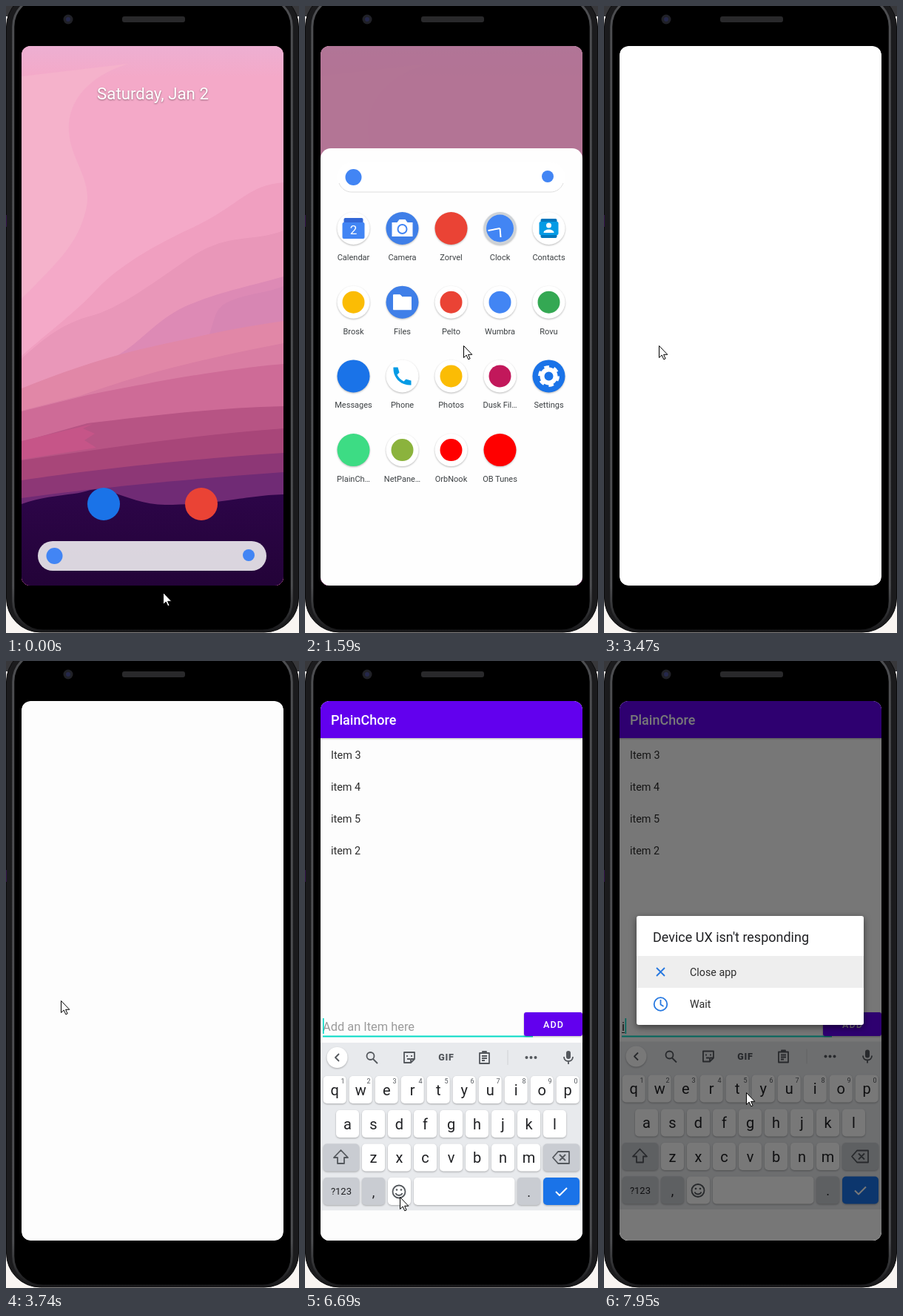
These frames come from a looping animation (396 px wide and 846 px high, 8000 ms). An HTML page:

```html
<!DOCTYPE html>
<html lang="en">
<head>
<meta charset="utf-8">
<title>Phone demo</title>
<style>
  html, body { margin: 0; width: 100%; height: 100%; overflow: hidden; background: #f9f5f2; }
  svg { display: block; width: 396px; height: 846px; font-family: Roboto, sans-serif; }
  .mid { text-anchor: middle; }
  .line { fill: none; stroke: #54585d; stroke-width: 1.8; stroke-linejoin: round; }
  .lift { filter: drop-shadow(0 1px 1px rgba(0, 0, 0, .28)); }
</style>
</head>
<body>
<svg id="stage" viewBox="0 0 396 846"></svg>
<script>
const LOOP = 8000;
const BLUE = '#1a73e8', PURPLE = '#6200ee', TEAL = '#03dac5';

const rect = (x, y, w, h, fill, r = 0, extra = '') =>
  `<rect x="${x}" y="${y}" width="${w}" height="${h}" rx="${r}" fill="${fill}" ${extra}/>`;
const circle = (x, y, r, fill, extra = '') =>
  `<circle cx="${x}" cy="${y}" r="${r}" fill="${fill}" ${extra}/>`;
const path = (d, fill, extra = '') => `<path d="${d}" fill="${fill}" ${extra}/>`;
const line = (d, extra = '') => `<path class="line" d="${d}" ${extra}/>`;
const text = (x, y, size, fill, value, extra = '') =>
  `<text x="${x}" y="${y}" font-size="${size}" fill="${fill}" ${extra}>${value}</text>`;
const group = (id, body, extra = '') => `<g id="${id}" ${extra}>${body}</g>`;
const MID = 'class="mid"', LIFT = 'class="lift"';

function phone() {
  return rect(0, 0, 396, 14, '#38383b') +
    rect(.5, -18, 395, 863, '#1b1b1d', 46, 'stroke="#0b0b0c"') +
    rect(9.75, -12, 376.5, 855, '#000', 40, 'stroke="url(#rim)" stroke-width="3"') +
    rect(0, 282, 1, 16, '#35134a') +
    circle(84, 18, 6.5, '#202127') + circle(84, 18, 3, '#25284b') +
    rect(157, 14, 85, 8, '#29292b', 3);
}

function wallpaper() {
  const layers = [
    ['#f09fc0', 'M21 472C60 438 95 412 120 385S185 330 250 300 325 242 375 238'],
    ['#e997b9', 'M21 476C55 445 78 428 115 418S190 380 245 342 330 320 375 303'],
    ['#dd8ab5', 'M150 472C185 452 205 420 250 402S330 378 375 365'],
    ['#d786b3', 'M274 445C284 420 280 406 308 396S350 388 375 378'],
    ['#e187a7', 'M21 516C80 492 140 472 200 459S310 434 375 425'],
    ['#d97da3', 'M21 546L100 526C160 505 230 483 375 455'],
    ['#ce6b97', 'M21 547L110 525C190 509 290 490 375 483'],
    ['#b75484', 'M21 588L110 563C190 554 280 542 375 540'],
    ['#c65588', 'M21 587L117 564 104 570 120 577 106 586 122 596 21 612'],
    ['#a84679', 'M21 613C130 598 240 580 375 570'],
    ['#8d3776', 'M21 640C120 625 250 611 375 603'],
    ['#702b75', 'M21 664C120 650 250 638 375 629'],
    ['url(#night)', 'M21 672C45 663 70 661 92 658S118 648 140 655 188 673 215 673 270 671 300 667 345 660 375 659']
  ];
  return rect(21, 54, 354, 728, '#f4a9c8') +
    rect(21, 54, 354, 42, 'url(#sky)') +
    path('M21 95L165 78C110 95 82 130 85 170S118 235 108 275 82 335 21 395Z', '#f5b2cb') +
    layers.map(([fill, d]) =>
      path(d + (fill === '#c65588' ? 'Z' : 'V782H' + d.match(/\d+/)[0] + 'Z'), fill)).join('');
}

const disc = (fill, art = '') => circle(0, 0, 22, fill, LIFT) + art;
const badge = fill => disc('#fff', circle(0, 0, 15, fill));
const gear = `${circle(0, 0, 9, 'none', 'stroke="#fff" stroke-width="6"')}
  ${circle(0, 0, 12.5, 'none', 'stroke="#fff" stroke-width="4" stroke-dasharray="6.5 6.6"')}`;

const apps = [
  ['Calendar', disc('#fff', rect(-13, -14, 26, 8, '#3367d6', 2) + rect(-15, -8, 30, 22, '#4285f4', 2) +
    text(0, 8, 17, '#fff', '2', MID))],
  ['Camera', disc('#3f7fe8', path('M-14 -8H-7L-4 -12H4L7 -8H14V11H-14Z', '#fff') +
    circle(0, 1, 7, '#4285f4') + circle(0, 1, 5, '#fff'))],
  ['Zorvel', disc('#ea4335')],
  ['Clock', disc('#cdd2d7', circle(0, 0, 18.5, '#4285f4') +
    '<path d="M0 0L-16 3M0 0L1 12" fill="none" stroke="#fff" stroke-width="2"/>')],
  ['Contacts', disc('#fff', rect(-11, -13, 22, 26, '#0277bd', 2) + rect(-13, -9, 26, 18, '#039be5', 2) +
    circle(0, -4, 3.5, '#fff') + path('M-7 6C-7 0 7 0 7 6Z', '#fff'))],
  ['Brosk', badge('#fbbc04')],
  ['Files', disc('#3f7fe8', path('M-12 -10H-3L0 -7H12V10H-12Z', '#fff', 'stroke="#fff" stroke-linejoin="round"'))],
  ['Pelto', badge('#ea4335')],
  ['Wumbra', badge('#4285f4')],
  ['Rovu', badge('#34a853')],
  ['Messages', disc(BLUE)],
  ['Phone', disc('#fff', path('M-12 -12H-6L-4 -5 -7 -2C-5 2 -2 5 2 7L5 4 12 6V12C-2 13 -13 2 -12 -12Z', '#039be5'))],
  ['Photos', badge('#fbbc04')],
  ['Dusk Fil…', badge('#c2185b')],
  ['Settings', disc(BLUE, gear)],
  ['PlainCh…', disc('#3ddc84')],
  ['NetPane…', badge('#8bb33d')],
  ['OrbNook', badge('#f00')],
  ['OB Tunes', disc('#f00')]
];

// Drawn with the sheet's top edge at y = 0.
function drawer() {
  const grid = apps.map(([label, icon], i) => {
    const x = 65.5 + 66 * (i % 5), y = 108 + 99.7 * Math.floor(i / 5);
    return `<g transform="translate(${x} ${y})">${icon}
      ${text(0, 43, 11, '#3c4043', label, MID)}</g>`;
  }).join('');
  const barEdge = line('M46 47C49 55 56 59 63 59H332C339 59 346 55 349 47', 'style="stroke:#dedede;stroke-width:1"');
  return group('sheet', rect(21, 0, 354, 900, '#fefefe', 14)) +
    group('hotseat', circle(132, -31, 22, BLUE) + circle(264, -31, 22, '#ea4335')) +
    rect(43, 19, 309, 40, '#fff', 20, 'opacity=".83"') +
    circle(65.5, 39, 11, '#4285f4') + circle(328, 38, 8, '#4285f4') +
    group('grid', barEdge + grid + circle(65.5, 407.1, 22.5, '#000', 'id="press" opacity=".15"'));
}

function todo() {
  const items = ['Item 3', 'item 4', 'item 5', 'item 2'];
  const field = text(24, 767, 16.4, '#9b9b9b', 'Add an Item here', 'id="hint"') +
    group('typed', text(24, 767, 16.4, '#222', 'i') + rect(24, 769, 4, 1, '#222')) +
    rect(24, 773, 284, 1.5, '#8d8d8d', 0, 'id="idleLine"') +
    rect(24, 773.5, 284, 2, TEAL, 0, 'id="focusLine"') +
    rect(24, 750, 1.6, 21, TEAL, 0, 'id="caret"') +
    rect(296, 742, 79, 32, PURPLE, 3, LIFT) +
    text(336, 763, 12.6, '#fff', 'ADD', MID + ' font-weight="500" letter-spacing="1.1"');
  return rect(21, 54, 354, 728, '#fdfdfd') +
    rect(21, 54, 354, 50, PURPLE, 0, LIFT) +
    text(35, 86, 18, '#fff', 'PlainChore', 'font-weight="500"') +
    group('items', items.map((s, i) => text(35, 131.5 + 43.3 * i, 14.4, '#2c2c2c', s)).join('')) +
    group('field', field);
}

function keyboard() {
  const key = (x, y, w, label = '', fill = '#fff', size = 20) =>
    rect(x, y, w, 37, fill, 5, LIFT) +
    text(x + w / 2, y + (size < 16 ? 23 : 25.5), size, '#202124', label, MID);
  const row = (letters, x, y) => [...letters].map((c, i) => key(x + 35 * i, y, 31, c)).join('');
  const grey = '#c9ccd2';
  const numbers = [...'1234567890'].map((n, i) => text(51 + 35 * i, 570, 9, '#54585d', n, MID)).join('');
  const smile = circle(127, 716, 8.5, 'none', 'class="line"') + circle(124, 713.5, 1.3, '#54585d') +
    circle(130, 713.5, 1.3, '#54585d') + line('M122.5 718C124 722 130 722 131.5 718');
  const tools = circle(43.5, 535, 14, '#fff', LIFT) + line('M46 530L41 535 46 540') +
    circle(88.5, 533, 5, 'none', 'class="line"') + line('M92 537L98 543') +
    line('M134 528H148V537L143 542H134ZM148 537H143V542M138 532V534M144 532V534M138 537H142') +
    text(191, 539, 12.5, '#54585d', 'GIF', MID + ' font-weight="900" letter-spacing=".8"') +
    line('M236 529H249V543H236ZM240 529V527H245V529M239 533H246M239 536H246M239 539H243') +
    rect(273.5, 525, 1, 20, '#cfd2d6') +
    [299.5, 305.5, 311.5].map(x => circle(x, 535, 2, '#54585d')).join('') +
    rect(353, 526, 6, 11, '#54585d', 3) + line('M350 534C350 542 362 542 362 534M356 540V544');
  return rect(21, 515, 354, 226.5, '#e8eaed') + rect(21, 741.5, 354, 43, '#fdfdfd') + tools +
    row('qwertyuiop', 24.7, 560) + numbers + row('asdfghjkl', 42, 606) +
    key(24.7, 651.5, 48.5, '', grey) + row('zxcvbnm', 77, 651.5) + key(322, 651.5, 49, '', grey) +
    line('M48.5 660L39 670H44V678H53V670H58Z') +
    line('M342 662H357V678H342L335 670ZM344 666L352 674M352 666L344 674') +
    key(24.7, 697, 48.5, '?123', grey, 13) + key(77, 697, 31, ',', grey, 18) + key(112, 697, 31) + smile +
    key(147, 697, 136.5) + key(287, 697, 31, '.', grey, 18) + key(322, 697, 49, '', BLUE) +
    line('M339 716L344 721 354 711', 'style="stroke:#fff;stroke-width:2"');
}

function dialog() {
  const blue = 'style="stroke:#2678e0"';
  return rect(21, 54, 354, 728, '#000', 0, 'opacity=".53"') +
    rect(44, 344, 307, 147, '#fff', 3, 'style="filter:drop-shadow(0 3px 5px #0008)"') +
    rect(44, 398, 307, 43, '#eee') +
    text(66, 379, 18, '#202124', "Device UX isn't responding") +
    text(116, 425, 14.3, '#2c2c2c', 'Close app') + text(116, 468, 14.3, '#2c2c2c', 'Wait') +
    line('M71 414L82 425M82 414L71 425', blue) +
    circle(76.5, 463, 8.8, 'none', 'class="line" ' + blue) + line('M76.5 457V463.5L80.5 466', blue);
}

document.getElementById('stage').innerHTML = `
  <defs>
    <linearGradient id="sky" x2="0" y2="1"><stop stop-color="#edafd2"/><stop offset="1" stop-color="#f4a9c8"/></linearGradient>
    <linearGradient id="night" x2="0" y2="1"><stop stop-color="#2d0549"/><stop offset="1" stop-color="#230338"/></linearGradient>
    <linearGradient id="rim" x2="0" y2="1"><stop offset=".93" stop-color="#4c4d50"/><stop offset="1" stop-color="#19191b"/></linearGradient>
    <clipPath id="screen">${rect(21, 54, 354, 728, '#000', 12)}</clipPath>
  </defs>` + phone() +
  group('display',
    group('home', wallpaper() + rect(21, 54, 354, 728, '#a36789', 0, 'id="scrim"') +
      text(198.5, 126, 22.3, '#fff', 'Saturday, Jan 2', MID + ' id="date" style="filter:drop-shadow(0 1px 1px #0006)"') +
      group('drawer', drawer())) +
    rect(0, 0, 0, 0, '#fff', 0, 'id="splash"') +
    group('todo', todo()) + group('keyboard', keyboard()) + group('dialog', dialog()),
    'clip-path="url(#screen)"') +
  group('pointer', path('M0 0V16L3.7 12.6 6.3 18.3 8.6 17.3 6.1 11.8H11.3Z', '#fff', 'stroke="#000"'));

// Each row: start time, then the values held from that moment on.
const pointerSteps = [
  [0, 212, 791], [430, 199, 690], [550, 183, 591], [1230, 195, 545], [1350, 214, 458],
  [2290, 146, 474], [2410, 79, 482], [2560, 74, 458], [3890, 110, 436], [4010, 153, 408],
  [4410, 116, 330], [4530, 84, 258], [4680, 78, 260], [4800, 72, 259], [4920, 69, 259],
  [5070, 88, 412], [5220, 132, 665], [5490, 124, 720], [5610, 118, 758], [5760, 118, 759],
  [6690, 128, 723], [7120, 162, 650], [7240, 192, 582]
];
const SHEET_REST = 703, SHEET_OPEN = 49;
const sheetSteps = [
  [0, SHEET_REST], [1230, 650], [1350, 530], [1470, 335], [1590, 192], [1740, 70], [1860, 50], [2010, SHEET_OPEN]
];
const splashSteps = [[0, 0], [3110, .25], [3230, .65], [3350, .93], [3470, 1]];

const held = (steps, t) => steps.findLast(step => step[0] <= t).slice(1);
const clamp = v => Math.max(0, Math.min(1, v));
const mix = (a, b, p) => a + (b - a) * p;
const el = id => document.getElementById(id);
const set = (id, attrs) => Object.entries(attrs).forEach(([k, v]) => el(id).setAttribute(k, v));
const show = (id, on) => set(id, { visibility: on ? 'inherit' : 'hidden' });
const move = (id, x, y) => set(id, { transform: `translate(${x} ${y})` });

function draw(t) {
  const [sheetY] = held(sheetSteps, t);
  const open = (SHEET_REST - sheetY) / (SHEET_REST - SHEET_OPEN);
  move('drawer', 0, sheetY);
  set('sheet', { opacity: clamp(open * 1.6) });
  set('hotseat', { opacity: clamp(1 - open * 3) });
  set('date', { opacity: clamp(1 - open * 2) });
  set('grid', { opacity: clamp((open - .25) / .4) });
  set('scrim', { opacity: .8 * clamp(open / .78) });
  show('press', t >= 2960);

  const [grow] = held(splashSteps, t);
  show('splash', grow > 0);
  set('splash', {
    x: mix(43, 21, grow), y: mix(434, 54, grow), width: mix(46, 354, grow), height: mix(46, 728, grow),
    rx: mix(23, 12, grow), fill: t < 3740 ? '#fff' : '#fdfdfd'
  });

  const typing = t >= 6690, typed = t >= 7670;
  show('home', t < 3470);
  show('todo', t >= 3890);
  show('items', t >= 4010);
  move('field', 0, typing ? -268 : 0);
  show('hint', !typed);
  show('typed', typed);
  show('idleLine', t < 6010);
  show('focusLine', t >= 6010);
  show('caret', (t >= 6280 && t < 6840) || t >= 7240);
  move('caret', typed ? 4.5 : 0, 0);
  show('keyboard', typing);
  move('keyboard', 0, t < 6840 ? 0 : -1.5);
  show('dialog', t >= 7950);

  const [x, y] = held(pointerSteps, t);
  move('pointer', x + .5, y + .5);
}

const start = performance.now();
function tick() {
  draw((performance.now() - start) % LOOP);
  requestAnimationFrame(tick);
}
tick();
</script>
</body>
</html>
```
